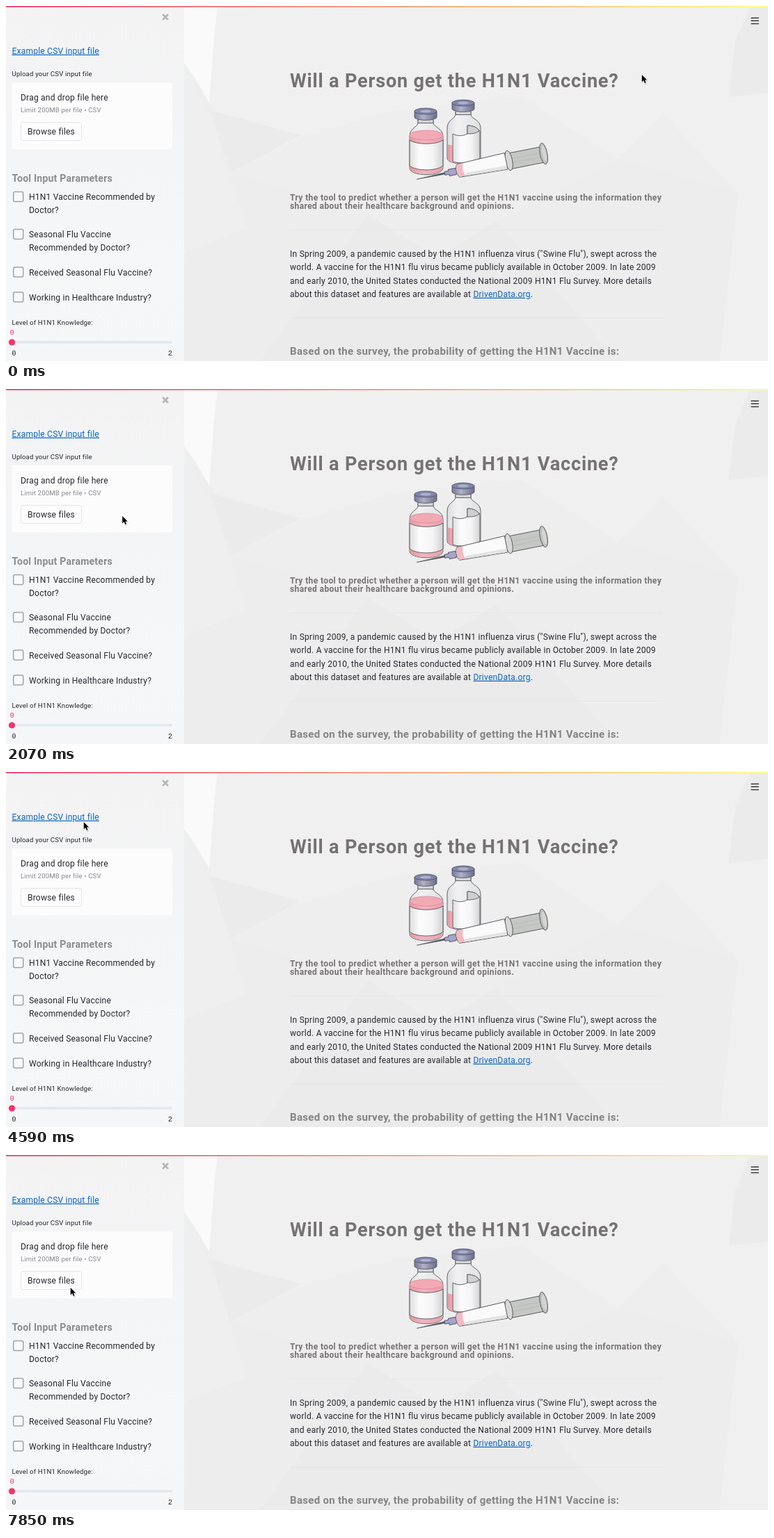
An HTML page that plays this animation: 1095 px wide and 511 px high, repeating every 8000 ms.

```html
<!DOCTYPE html>
<html lang="en">
<head>
<meta charset="utf-8">
<title>Vaccine prediction tool</title>
<style>
html, body { margin: 0; width: 100%; height: 100%; overflow: hidden; background: #f0f0f0; }
svg { display: block; width: 1095px; height: 511px; }
text { font: 12.06px Roboto, "Open Sans", sans-serif; fill: #262730; letter-spacing: .2px; white-space: pre; }
.para text { letter-spacing: .25px; }
.para text.last { letter-spacing: .2px; }
text.small { font-size: 9.65px; letter-spacing: .16px; }
text.hint { fill: #878891; letter-spacing: .13px; }
text.title { font-size: 27.1px; font-weight: 700; letter-spacing: .8px; fill: #767273; }
text.lead { font-size: 12.06px; font-weight: 700; letter-spacing: .375px; fill: #777374; }
text.head { font-size: 15.07px; font-weight: 700; letter-spacing: .27px; fill: #858384; }
text.side { font-size: 14.1px; font-weight: 700; letter-spacing: .2px; fill: #8b8c90; }
text.num { font: 10.5px "Liberation Mono", "DejaVu Sans Mono", monospace; letter-spacing: 0; }
.link { fill: #0a66c8; text-decoration: underline; }
text.link { fill: #0a66c8; }
.box { fill: #fafafb; stroke: #a0a2a9; stroke-width: 1.5; }
.ink { stroke: #55555c; stroke-width: .9; stroke-linejoin: round; }
</style>
</head>
<body>
<svg viewBox="0 0 1095 511">
  <defs>
    <linearGradient id="strip"><stop stop-color="#f63366"/><stop offset="1" stop-color="#fffd80"/></linearGradient>
    <linearGradient id="sideBg" x2="0" y2="1">
      <stop stop-color="#f3f3f4"/><stop offset=".45" stop-color="#f4f5f6"/><stop offset=".75" stop-color="#f6f7f9"/><stop offset="1" stop-color="#f5f6f8"/>
    </linearGradient>
    <linearGradient id="paper"><stop stop-color="#dedede"/><stop offset=".3" stop-color="#fcfcfc"/><stop offset=".7" stop-color="#f4f4f4"/><stop offset="1" stop-color="#d2d2d4"/></linearGradient>
    <linearGradient id="glass"><stop stop-color="#dcdddf"/><stop offset=".3" stop-color="#f1f1f2"/><stop offset="1" stop-color="#e0e1e3"/></linearGradient>
    <linearGradient id="pink"><stop stop-color="#e995a3"/><stop offset=".4" stop-color="#f4b4bd"/><stop offset="1" stop-color="#e9a0ac"/></linearGradient>
    <linearGradient id="cap"><stop stop-color="#74769a"/><stop offset=".4" stop-color="#b0b2c8"/><stop offset="1" stop-color="#6a6c8c"/></linearGradient>
    <g id="lid">
      <path class="ink" fill="#d3d4d9" d="M-11 10V17H11V10Z"/>
      <path class="ink" fill="url(#cap)" d="M-16 0V9C-13 14 13 14 16 9V0Z"/>
      <ellipse class="ink" rx="16" ry="4.4" fill="#8285ac"/>
      <ellipse rx="8" ry="1.9" fill="#aeb1cd"/>
    </g>
  </defs>

  <!-- faceted backdrop -->
  <rect x="256" width="839" height="511" fill="#f0f0f0"/>
  <path fill="#eeeeee" d="M293 140L575 0H800L1052 270L1025 511H256V85Z"/>
  <path fill="#f0f0f0" d="M300 0H1070L1048 50L880 220L740 130L560 150L420 190L322 240L293 140Z"/>
  <path fill="#ebebeb" d="M293 150L424 186L322 240Z"/>
  <path fill="#efefef" d="M256 85L293 158L345 320L256 356Z"/>
  <path fill="#ededed" d="M256 356L345 320L322 240L520 300L365 511H256Z"/>
  <path fill="#ebebeb" d="M520 300L620 362L705 310L880 511H365Z"/>
  <path fill="#ededed" d="M880 220L1052 270L1025 511H880L705 310Z"/>
  <path fill="#ebebeb" d="M1095 0H1070L1048 50L1038 131L1095 125Z"/>
  <path fill="#fafafa" d="M256 0H304L299 45L292 139L272 104L256 82Z"/>
  <path stroke="#e6e6e7" d="M408 322H944M408 449.500H944"/>

  <!-- sidebar -->
  <rect width="256" height="511" fill="url(#sideBg)"/>
  <path d="M225.200 12L233 19.800M233 12L225.200 19.800" stroke="#b5b5b7" stroke-width="2.600"/>
  <text class="link" x="8.500" y="68.800">Example CSV input file</text>
  <text class="small" x="8.500" y="100.600">Upload your CSV input file</text>
  <rect x="8.500" y="110" width="230.500" height="96.500" rx="3" fill="#fcfcfc"/>
  <text x="21" y="136">Drag and drop file here</text>
  <text class="small hint" x="21" y="153">Limit 200MB per file • CSV</text>
  <rect x="21.500" y="167.500" width="87" height="26" rx="2.500" fill="#fdfdfd" stroke="#e4e6eb"/>
  <text x="31" y="184.600">Browse files</text>
  <text class="side" x="8.500" y="252.800">Tool Input Parameters</text>
  <g id="checks"></g>
  <text class="small" x="8.500" y="459">Level of H1N1 Knowledge:</text>
  <text class="num" x="5.500" y="473.300" style="fill:#f63366">0</text>
  <rect x="8.500" y="482.300" width="230.500" height="3.200" rx="1.500" fill="#dde8f0"/>
  <circle cx="8.500" cy="484" r="4.600" fill="#f63366"/>
  <text class="num" x="8.300" y="502.800">0</text>
  <text class="num" x="232.700" y="502.800">2</text>

  <!-- main column -->
  <text class="title" x="408" y="117">Will a Person get the H1N1 Vaccine?</text>
  <text class="lead" x="408" y="279.700">Try the tool to predict whether a person will get the H1N1 vaccine using the information they</text>
  <text class="lead" x="408" y="292.200">shared about their healthcare background and opinions.</text>
  <g class="para">
    <text x="408" y="360.900">In Spring 2009, a pandemic caused by the H1N1 influenza virus ("Swine Flu"), swept across the</text>
    <text x="408" y="380.200">world. A vaccine for the H1N1 flu virus became publicly available in October 2009. In late 2009</text>
    <text x="408" y="399.500">and early 2010, the United States conducted the National 2009 H1N1 Flu Survey. More details</text>
    <text class="last" x="408" y="418.800">about this dataset and features are available at <tspan class="link">DrivenData.org</tspan>.</text>
  </g>
  <text class="head" x="408" y="501.500">Based on the survey, the probability of getting the H1N1 Vaccine is:</text>

  <!-- back vial -->
  <path class="ink" fill="url(#glass)" d="M646 152V157C644 163 634 164 634 176V219C634 230 682 230 682 219V176C682 164 670 163 668 157V152Z"/>
  <path fill="url(#pink)" d="M635 200C640 199 646 203 656 208V227C645 227 635 224 635 219Z"/>
  <path class="ink" fill="url(#paper)" d="M642 184C650 188 657 187 663 184V172C671 172 678 176 681 180V219C676 225 652 228 642 224Z"/>
  <path class="ink" fill="#cfcfd1" d="M663 172C671 172 678 175 680 180C674 184 668 184 663 184Z"/>
  <use href="#lid" x="657" y="139.500"/>

  <!-- front vial -->
  <path class="ink" fill="url(#glass)" d="M592 164V169C590 175 580 176 580 188V233C580 246 628 246 628 233V188C628 176 616 175 614 169V164Z"/>
  <path fill="url(#pink)" d="M580.500 186H627.500V233C627 245 581 245 580.500 233Z"/>
  <ellipse cx="604" cy="186" rx="23.600" ry="7" fill="#f2a9b4" stroke="#d98a96" stroke-width=".8"/>
  <path class="ink" fill="url(#paper)" d="M580 193C589 200 619 200 628 193V230C619 238 589 238 580 230Z"/>
  <use href="#lid" x="603" y="151.500"/>

  <!-- syringe -->
  <g transform="translate(650 237) rotate(-11.300)">
    <path d="M-61 .5L-18 -1.200V1.200Z" fill="#55565c" stroke="#55565c" stroke-width=".6"/>
    <path class="ink" fill="#a5a5cb" d="M-20 -2.500H-14V-4.500H-4V-3H1V3.500H-4V5H-14V2.500H-20Z"/>
    <path class="ink" fill="#c5c7c3" d="M74 -10.500H122V12.500H74Z"/>
    <path d="M78 -2H121M78 4H121" stroke="#b9bbb7"/>
    <ellipse class="ink" cx="125" rx="5.200" ry="15.500" fill="#c0c2be"/>
    <ellipse cx="126" rx="2.800" ry="11.500" fill="#d3d5d1"/>
    <ellipse class="ink" cx="74" rx="5" ry="14.500" fill="#d8d9d7"/>
    <path class="ink" fill="#fafafa" d="M0 -9.500L70 -12V12L0 9.500C-4 6 -4 -6 0 -9.500Z"/>
    <path fill="#f3bac3" d="M0 -9L9 -9.300C6 -5 6 5 9 9.300L0 9C-3 6 -3 -6 0 -9Z"/>
    <path fill="#e3e3e4" d="M9 5L69.500 6.500V11.500L9 9.300Z"/>
  </g>

  <path d="M1070.500 17.200H1081.800M1070.500 21.300H1081.800M1070.500 25.400H1081.800" stroke="#3a3b42" stroke-width="1.500"/>
  <rect width="1095" height="1.700" fill="url(#strip)"/>

  <g id="cursor">
    <path transform="translate(.4 1.100)" fill="#000" opacity=".18" d="M1 0V12.500L3.600 10L5.400 14.200L8 13.200L6.200 9H9.800Z"/>
    <path fill="#000" stroke="#fff" stroke-width="1.600" stroke-linejoin="round" paint-order="stroke"
      d="M1.200 1V11.400L3.600 9.100L5.300 13.100L7.200 12.300L5.500 8.400H8.700Z"/>
  </g>
</svg>
<script>
const LOOP = 8000;
const SVG = "http://www.w3.org/2000/svg";

function add(parent, tag, attrs, text = "") {
  const el = document.createElementNS(SVG, tag);
  for (const k in attrs) el.setAttribute(k, attrs[k]);
  el.textContent = text;
  parent.append(el);
}

const checks = document.getElementById("checks");
[
  [274.5, "H1N1 Vaccine Recommended by", "Doctor?"],
  [328.5, "Seasonal Flu Vaccine", "Recommended by Doctor?"],
  [383, "Received Seasonal Flu Vaccine?"],
  [419, "Working in Healthcare Industry?"]
].forEach(([y, ...lines]) => {
  add(checks, "rect", { class: "box", x: 10.7, y: y - 7, width: 14, height: 14, rx: 2 });
  lines.forEach((s, i) => add(checks, "text", { x: 33, y: y + 4.5 + i * 18.6 }, s));
});

// Pointer stops: time, left, top. Each is held until the next.
const stops = [
  [0, 912.5, 98], [150, 910, 100], [300, 907, 101], [450, 906, 98],
  [890, 880, 108], [1040, 740, 135], [1190, 550, 152], [1340, 400, 166],
  [1480, 294, 174], [1630, 200, 181], [1770, 167, 182],
  [2070, 166, 182], [2810, 165, 182], [3260, 164, 182.5], [3560, 163, 183],
  [3850, 161, 180], [4000, 154, 166], [4150, 143, 136], [4290, 129, 106],
  [4440, 115, 82], [4590, 110.5, 71], [4730, 111, 68], [4880, 112, 67],
  [5930, 112, 68], [6080, 112, 69],
  [6530, 112, 70], [6680, 111.5, 72], [6830, 111, 73], [6980, 110, 75],
  [7120, 109.3, 76], [7270, 109, 79], [7420, 108, 82], [7560, 107, 85],
  [7710, 103, 120], [7850, 91.5, 190]
];
const cursor = document.getElementById("cursor");

function draw(t) {
  const [, x, y] = stops.findLast(s => s[0] <= t);
  cursor.setAttribute("transform", `translate(${x} ${y})`);
}

let start = null;
function tick(now) {
  start ??= now;
  draw(Math.max(0, now - start) % LOOP);
  requestAnimationFrame(tick);
}
draw(0);
requestAnimationFrame(tick);
</script>
</body>
</html>
```
